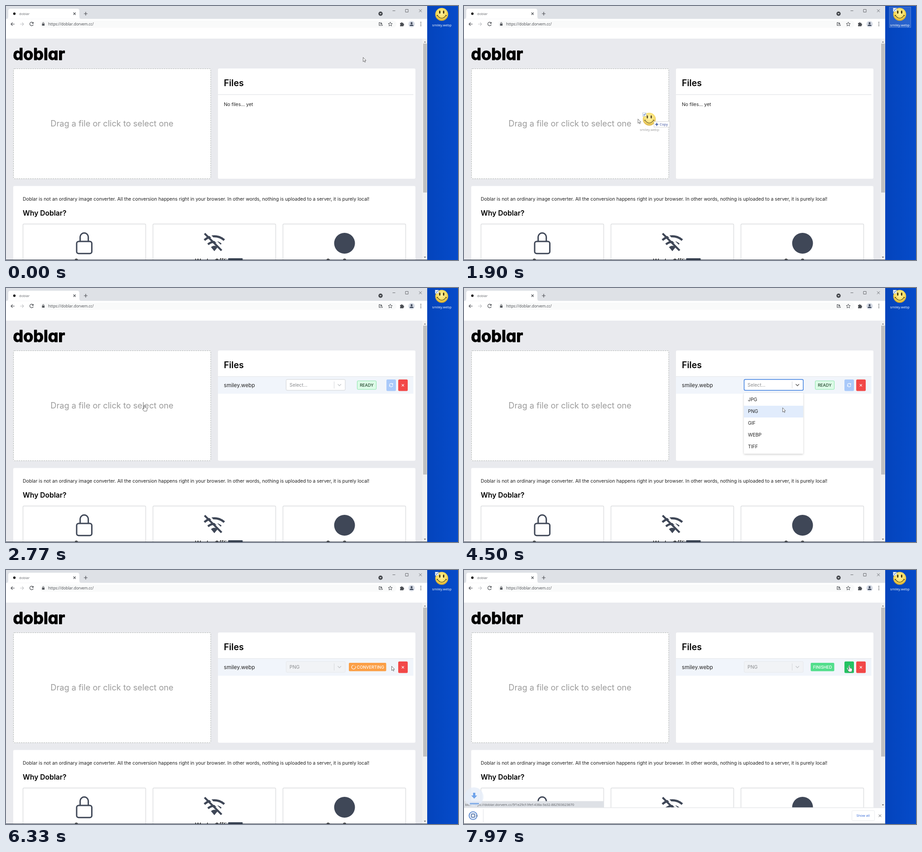
Animation of 998x561 px, one loop 8000 ms. Source, as an HTML page:

```html
<!DOCTYPE html>
<html lang="en">
<head>
<meta charset="utf-8">
<title>doblar</title>
<style>
  html, body { margin: 0; width: 100%; height: 100%; overflow: hidden; }
  svg { display: block; width: 998px; height: 561px; font: 10.4px Inter, sans-serif; font-optical-sizing: none; }
  .ui { font-family: "Open Sans", "Noto Sans", sans-serif; }
  .mid { text-anchor: middle; }
  .line { fill: none; stroke: #4a4d52; stroke-width: 1.2; }
  .white { fill: none; stroke: #fff; stroke-width: 1.1; }
  .icon { fill: none; stroke: #3f4757; }
  .tag { font-size: 9.1px; font-weight: 500; }
</style>
</head>
<body>
<svg viewBox="0 0 998 561">
  <defs>
    <linearGradient id="desk"><stop stop-color="#0444bc"/><stop offset="1" stop-color="#054bca"/></linearGradient>
    <radialGradient id="gold" cy=".4" r=".56">
      <stop stop-color="#fff0a0"/><stop offset=".7" stop-color="#f8dc5c"/><stop offset="1" stop-color="#d9ae30"/>
    </radialGradient>
    <filter id="soft" x="-20%" y="-20%" width="140%" height="150%">
      <feDropShadow dx="0" dy="1.5" stdDeviation="2" flood-opacity=".2"/>
    </filter>
    <g id="face">
      <circle cy=".5" r="14.3" fill="url(#gold)"/>
      <ellipse cx="-4.3" cy="-4.500" rx="1.500" ry="3.500" fill="#3a2c08"/>
      <ellipse cx="4.3" cy="-4.500" rx="1.500" ry="3.500" fill="#3a2c08"/>
      <path d="M-9.500 3Q0 15 9.500 3M-11 3.600l2.600-1.500M11 3.600l-2.600-1.500" fill="none" stroke="#3a2c08" stroke-width="1.1"/>
    </g>
    <g id="check">
      <rect x="-14.500" y="-13.500" width="7.500" height="7.500" fill="#fff" stroke="#8aa0c0" stroke-width=".6"/>
      <path d="M-13-10l1.700 1.900 3-3.700" fill="none" stroke="#3565b5" stroke-width="1.1"/>
    </g>
  </defs>

  <!-- desktop -->
  <rect x="930" width="68" height="561" fill="url(#desk)"/>
  <rect id="picked" x="939" y="2.500" width="47.500" height="45" fill="#fff" fill-opacity=".14" stroke="#fff" stroke-opacity=".3" stroke-width=".8"/>
  <use href="#face" x="962" y="18"/>
  <use id="ticked" href="#check" x="962" y="18"/>
  <text class="ui mid" x="962.500" y="45" font-size="7.450" fill="#fff">smiley.webp</text>

  <!-- browser frame -->
  <rect width="930" height="561" fill="#fff"/>
  <rect id="strip" width="930" height="28.500"/>
  <path d="M0 28.500Q5 28.500 5 24V11Q5 6 10 6H157Q162 6 162 11V24Q162 28.500 167 28.500Z" fill="#fff"/>
  <circle cx="18.500" cy="17" r="2.700" fill="#111"/>
  <text id="tab" class="ui" x="29" y="19.700" font-size="7.600">doblar</text>
  <path class="line" d="M148.800 14.500l5 5m0-5l-5 5M172 17h8m-4-4v8"/>
  <circle cx="827" cy="17" r="4.700" fill="#44474c"/>
  <path d="M824.800 16h4.400l-2.200 2.600z" fill="#fff"/>
  <path id="caption" class="line" style="stroke-width:.9" d="M853.500 10.500h6M882 7.500h6v6h-6zM912 7.500l6 6m0-6l-6 6"/>
  <rect x="75" y="32" width="787" height="16" rx="8" fill="#f9fafa"/>
  <path class="line" d="M19 40h-8m3.500-3.500L11 40l3.500 3.500M60 37.500a4 4 0 1 0 .3 3.500"/>
  <path d="M60.800 35v4h-4z" fill="#4a4d52"/>
  <path class="line" style="stroke:#c3c5c8" d="M31 40h8m-3.500-3.500L39 40l-3.500 3.500"/>
  <rect x="79.500" y="39" width="5.600" height="4.600" rx=".6" fill="#55585d"/>
  <path class="line" style="stroke-width:1" d="M80.800 39v-1.300a1.500 1.500 0 0 1 3 0V39"/>
  <text class="ui" x="93" y="43" font-size="8.450" fill="#45484d">https://doblar.dorvem.cc/</text>
  <path class="line" d="M827 36.500h-3v6.500h7v-2m-2.500-5v4.500m-2-2l2 2 2-2"/>
  <path class="line" style="stroke-width:1" d="M848.500 35.500l1.300 3 3.200.3-2.400 2.100.7 3.200-2.800-1.700-2.800 1.700.7-3.200-2.400-2.100 3.200-.3z"/>
  <path d="M870 37.500h2.300a1.500 1.500 0 1 1 3 0h2.300v2.300a1.500 1.500 0 1 1 0 3v2H870v-2.300a1.400 1.400 0 0 0 0-2.700z" fill="#4a4d52"/>
  <circle cx="895.500" cy="40" r="7" fill="#d5dae4"/>
  <circle cx="895.500" cy="38" r="2.200" fill="#3c4659"/>
  <path d="M891.300 44q0-3 4.200-3t4.200 3z" fill="#3c4659"/>
  <path d="M916 36v8" stroke="#4a4d52" stroke-width="2" stroke-linecap="round" stroke-dasharray="0 3.700"/>

  <!-- page -->
  <rect y="72" width="919" height="489" fill="#e9eaee"/>
  <rect x="919" y="72" width="11" height="489" fill="#f1f1f1"/>
  <rect x="921" y="83" width="8.500" height="329" fill="#c1c1c1"/>
  <path d="M922.700 80.500l2.300-2.600 2.300 2.600z" fill="#777"/>
  <text x="15.500" y="118.700" font-size="36" font-weight="700" stroke="#000" stroke-width="1.300" stroke-linejoin="round" style="font-feature-settings:'cv11'">doblar</text>
  <rect x="16.500" y="138.500" width="435.500" height="243" rx="2" fill="#fff" stroke="#aeb3b0" stroke-dasharray="3 2"/>
  <text class="mid" x="234" y="266.300" font-size="18.200" fill="#9b9b9b">Drag a file or click to select one</text>
  <rect x="468" y="138" width="436" height="243.500" rx="3" fill="#fff"/>
  <text x="481" y="177" font-size="19.500" font-weight="600">Files</text>
  <rect x="468" y="195" width="431.500" height="1.300" fill="#e3e5e9"/>
  <text id="empty" x="481" y="220.700" fill="#222">No files... yet</text>

  <g id="row">
    <rect x="468" y="196.300" width="431.500" height="37.200" fill="#f1f5fb"/>
    <text x="481" y="218.700" font-size="11.700" fill="#222">smiley.webp</text>
    <rect id="select" x="618.500" y="202" width="130.500" height="24" rx="2.500"/>
    <path d="M724.500 206.500v15.500" stroke="#d5d7da"/>
    <path id="chevron" d="M732.500 212.300l3.700 3.700 3.700-3.700" fill="none" stroke-width="1.300"/>
    <text id="choice" x="626" y="217.900"></text>
    <g id="ready">
      <rect x="775.500" y="205" width="42" height="19" rx="2" fill="#dcfce7" stroke="#8be5ab"/>
      <text class="tag mid" x="796.400" y="217.700" fill="#24452f">READY</text>
      <rect id="convert" x="840" y="202" width="21" height="25.500" rx="2.500"/>
      <path class="white" d="M846.700 214a3.800 3.800 0 0 1 7-1.500m.3 2.500a3.800 3.800 0 0 1-7 1.500m7.200-5.700l-.3 2.300-2-.5m-5.500 4.800l.3-2.300 2 .5"/>
    </g>
    <g id="converting">
      <rect x="757" y="205" width="82.500" height="18.500" rx="2" fill="#fb9f46"/>
      <circle cx="767.500" cy="214.500" r="4.300" class="white" opacity=".35"/>
      <path id="spinner" class="white" d="M767.500 210.200a4.300 4.300 0 1 1-4.300 4.300" stroke-linecap="round"/>
      <text class="tag" x="774.500" y="217.700" fill="#fff">CONVERTING</text>
    </g>
    <g id="finished">
      <rect x="765.500" y="205" width="52" height="18.500" rx="2" fill="#52de8c"/>
      <text class="tag mid" x="791.700" y="217.700" fill="#fff">FINISHED</text>
      <rect x="840" y="202" width="21" height="25.500" rx="2.500" fill="#24c262"/>
      <path class="white" d="M850.500 210v6m-2.500-2.300l2.500 2.500 2.500-2.500M846.500 216v2.500h8V216"/>
    </g>
    <rect x="866" y="202" width="21" height="25.500" rx="2.500" fill="#f24848"/>
    <path class="white" d="M873.800 212.300l5 5m0-5l-5 5"/>
  </g>
  <g id="list" fill="#222">
    <rect x="618" y="232" width="131" height="134" rx="2.500" fill="#fff" filter="url(#soft)"/>
    <rect id="hover" x="618" width="131" height="26" fill="#e1ecfc"/>
  </g>

  <rect x="16" y="397.500" width="888" height="170" rx="3" fill="#fff"/>
  <text x="37" y="429.700" fill="#222">Doblar is not an ordinary image converter. All the conversion happens right in your browser. In other words, nothing is uploaded to a server, it is purely local!</text>
  <text x="37" y="462.700" font-size="15.600" font-weight="600">Why Doblar?</text>
  <g id="cards"></g>
  <rect x="156" y="520" width="33.500" height="26.700" rx="4.500" class="icon" stroke-width="3"/>
  <path class="icon" stroke-width="3" d="M163.700 520v-9.700a9 9 0 0 1 18 0v9.700"/>
  <path class="icon" stroke-width="4.600" d="M438 517a33 33 0 0 1 44 0M446 526.500a21 21 0 0 1 28.500 0"/>
  <path d="M452.500 532.500q7.500-6 15 0l-7.500 9z" fill="#3f4757"/>
  <path d="M443 499l38 38" stroke="#fff" stroke-width="4"/>
  <path class="icon" stroke-width="4.200" d="M438.500 502.500l37.500 37.500"/>
  <circle cx="747.500" cy="524" r="23" fill="#3f4757"/>
  <rect x="490.500" y="557.300" width="32" height="6" rx="1" fill="#2d3748"/>
  <path id="down" d="M922.700-7.300l2.300 2.600 2.300-2.600z" fill="#555"/>

  <!-- browser overlays, placed relative to the bottom of the page -->
  <g id="foot">
    <g id="link">
      <rect y="-14.500" width="309" height="14.500" fill="#dee1e6"/>
      <text class="ui" x="2.500" y="-4.500" font-size="7.350" fill="#5a5d62">blob:https://doblar.dorvem.cc/5f1e29cf-9fef-438a-9a32-882503623670</text>
    </g>
    <g id="arrow">
      <circle cx="22" cy="-24" r="21" fill="#e4ecf8" opacity=".75"/>
      <path d="M20-33h5v6h4l-6.500 7-6.500-7h4z" fill="#6fa3ea"/>
      <rect x="13" y="-10.500" width="20" height="3" fill="#7fabe8"/>
    </g>
    <rect y="-.5" width="930" height="40" fill="#fff"/>
    <rect y="-.5" width="930" height="1" fill="#dcdee1"/>
    <circle cx="20" cy="17.500" r="8.800" fill="#dfe9f8" stroke="#4a7cc9" stroke-width="1.600"/>
    <rect x="16.500" y="14" width="7" height="7" rx="1" fill="#fff" stroke="#44659a" stroke-width="1.500"/>
    <path class="line" style="stroke-width:.9" d="M26.500 19l1.700-2 1.700 2M915.700 15l5.500 5.500m0-5.500l-5.500 5.500"/>
    <path d="M42.500 3v30" stroke="#e0e2e5"/>
    <rect x="856.500" y="6.500" width="50" height="22" rx="2" fill="none" stroke="#e8eaed"/>
    <text class="ui mid" x="881.200" y="20.200" font-size="7.700" fill="#3367d6">Show all</text>
  </g>
  <rect y="560" width="930" height="1" fill="#3a4350"/>

  <g id="ghost">
    <use href="#face" opacity=".85"/>
    <use href="#check"/>
    <text class="ui mid" x=".5" y="26.500" font-size="7.450" fill="#999">smiley.webp</text>
    <rect x="10.500" y="5.700" width="34.500" height="12.500" fill="#fff" stroke="#c9c9c9" stroke-width=".8"/>
    <path d="M13 12h7m-3.500-3.500v7" stroke="#26469a" stroke-width="1.500"/>
    <text class="ui" x="23" y="14.800" font-size="7.700" fill="#33489a">Copy</text>
  </g>
  <g id="pointer" fill="#fff" stroke="#333" stroke-width=".7" stroke-linejoin="round">
    <path id="tip" d="M.5.500V10L2.700 8l1.500 3.200 1.500-.7L4.200 7.300H7z"/>
    <path id="hand" d="M-1.200.800Q0-.8 1.200.800V4.600L5 5.500Q6.600 6 6 9L5 13H-1L-4.300 8.500Q-4 6.600-2.600 7.200L-1.200 8.500z"/>
  </g>
</svg>
<script>
const LOOP = 8000;
const SELECTED = 1000, LIFT = 1440, REFOCUS = 1800, DROP = 2400, OPEN = 3770,
      PICK = 4750, CONVERT = 6130, DONE = 6970, SAVE = 7770;
const path = [
  [0, 788, 113], [40, 788, 113], [400, 880, 62], [770, 957, 15], [1000, 957, 15],
  [1430, 901, 112], [1650, 640, 190], [1900, 384, 249], [2300, 283, 256], [2670, 283, 256],
  [3050, 470, 273], [3470, 692, 227], [3500, 694, 226], [3600, 735, 214], [3770, 735, 214],
  [4500, 703, 264], [5230, 703, 264], [5420, 728, 269], [6000, 851, 212], [8000, 851, 212]
];
const $ = id => document.getElementById(id);
const show = (id, on) => $(id).style.display = on ? '' : 'none';
const set = (id, attrs) => Object.entries(attrs).forEach(([k, v]) => $(id).setAttribute(k, v));
const move = (id, x, y) => set(id, { transform: `translate(${x} ${y})` });
const ramp = (t, from, to) => Math.min(1, Math.max(0, (t - from) / (to - from)));

// Monotone cubic through the path points: smooth, without overshoot
const slope = (i, axis) => path[i] && path[i + 1]
  ? (path[i + 1][axis] - path[i][axis]) / (path[i + 1][0] - path[i][0]) : 0;
function tangent(i, axis) {
  const a = slope(i - 1, axis), b = slope(i, axis);
  return a * b > 0 ? 2 * a * b / (a + b) : 0;
}
function pointerAt(t) {
  const i = Math.max(0, path.findIndex(p => p[0] > t) - 1);
  const span = path[i + 1][0] - path[i][0], u = (t - path[i][0]) / span;
  return [1, 2].map(axis => {
    const a = path[i][axis], b = path[i + 1][axis], s = u * u * (3 - 2 * u);
    return a + (b - a) * s
      + span * u * (1 - u) * ((1 - u) * tangent(i, axis) - u * tangent(i + 1, axis));
  });
}

$('cards').innerHTML = ['Secure', 'Works Offline', 'Open Source'].map((title, i) => {
  const x = 37.5 + 287 * i;
  return `<rect x="${x}" y="481.500" width="271" height="100" rx="2" fill="none" stroke="#dadcde" stroke-width="1.400"/>
    <text class="mid" x="${x + 135.500}" y="567.700" font-size="13" font-weight="600" fill="#222">${title}</text>`;
}).join('');
$('list').innerHTML += ['JPG', 'PNG', 'GIF', 'WEBP', 'TIFF']
  .map((name, i) => `<text x="627" y="${250.3 + 26 * i}">${name}</text>`).join('');

function draw(t) {
  const [x, y] = pointerAt(t);
  const away = t >= SELECTED && t < REFOCUS;
  const picked = t >= PICK, busy = t >= CONVERT, focused = t >= OPEN && !busy;

  set('strip', { fill: away ? '#e6e9ec' : '#dee1e6' });
  set('tab', { fill: away ? '#8d9095' : '#65686d' });
  $('caption').style.stroke = away ? '#b9bbbe' : '#5c5f64';
  show('picked', t >= 700 && t < DROP);
  $('picked').style.opacity = t < SELECTED ? .6 : 1;
  show('ticked', t >= 700);

  show('empty', t < DROP);
  show('row', t >= DROP);
  set('select', {
    fill: busy ? '#f1f3f6' : '#fff',
    stroke: focused ? '#3b7de0' : busy ? '#e6e8eb' : '#d0d2d5',
    'stroke-width': focused ? 1.5 : 1
  });
  set('chevron', { stroke: focused ? '#555' : '#c4c6c9' });
  set('choice', { fill: picked && !busy ? '#333' : '#8b8d90' });
  $('choice').textContent = picked ? 'PNG' : 'Select...';
  show('ready', !busy);
  set('convert', { fill: picked ? '#3b82f6' : '#a9c9fa' });
  show('converting', busy && t < DONE);
  set('spinner', { transform: `rotate(${(t - CONVERT) * .36} 767.5 214.5)` });
  show('finished', t >= DONE);
  show('list', t >= OPEN && !picked);
  set('hover', { y: y < 260 ? 234 : 260 });

  const shelf = 561 - 36 * ramp(t, SAVE, SAVE + 130);
  move('foot', 0, shelf);
  move('down', 0, shelf);
  $('link').style.opacity = ramp(t, DONE, DONE + 200);
  show('arrow', t >= SAVE + 30);
  move('arrow', 0, -40 * (1 - ramp(t, SAVE, SAVE + 190)));

  show('ghost', t >= LIFT && t < DROP);
  const [gx, gy] = pointerAt(Math.max(0, t - 45));
  move('ghost', gx - 1, gy + 4.5);
  move('pointer', x, y);
  const overDrop = t >= DROP && x < 452;
  const overButton = x > 840 && y > 202 && (picked && !busy || t >= DONE);
  show('hand', overDrop || overButton);
  show('tip', !overDrop && !overButton);
}

function tick() {
  draw(performance.now() % LOOP);
  requestAnimationFrame(tick);
}
tick();
</script>
</body>
</html>
```
